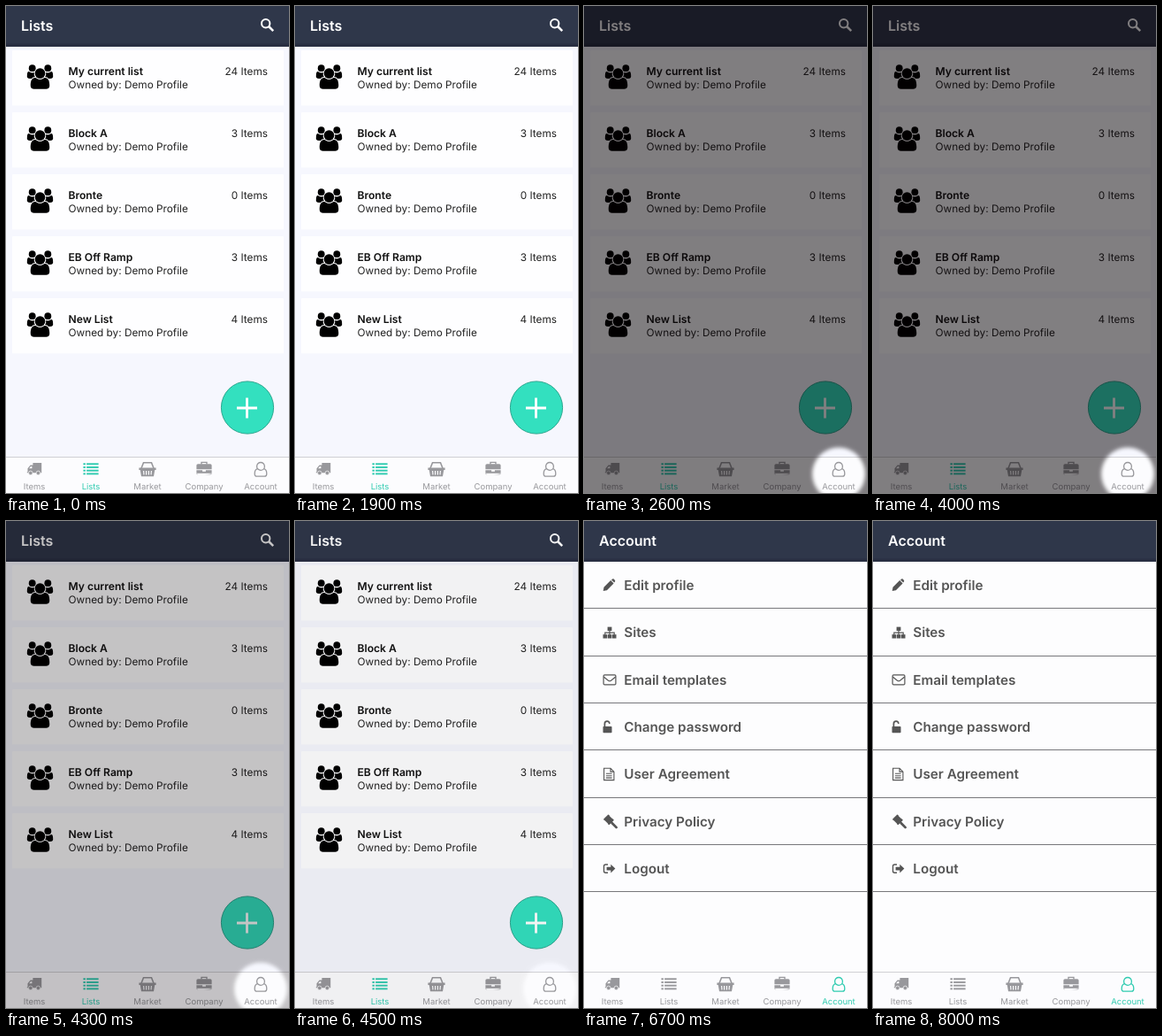
An HTML page that plays this animation: 320x550 px, repeating every 8.1 s.

```html
<!DOCTYPE html>
<html lang="en">
<head>
<meta charset="utf-8">
<title>Lists and account</title>
<style>
html, body { margin: 0; width: 100%; height: 100%; overflow: hidden; background: #fdfdfe }
svg { display: block; width: 320px; height: 550px; font-family: Inter, Roboto, sans-serif; text-rendering: geometricPrecision }
.title { font-size: 16px; font-weight: 600; fill: #fff }
.name { font-size: 12.1px; font-weight: 600; fill: #111 }
.info { font-size: 11.8px; fill: #222 }
.menu { font-size: 15.2px; font-weight: 600; fill: #555 }
.tab { font-size: 9.5px; text-anchor: middle }
.line { fill: none; stroke: currentColor }
.icon { fill: currentColor }
</style>
</head>
<body>
<svg id="stage" viewBox="0 0 320 550"></svg>
<script>
const LOOP = 8100, SWITCH = 6400, DIM = 0.5;
const stage = document.getElementById('stage');

const text = (cls, x, y, s, extra = '') => `<text class="${cls}" x="${x}" y="${y}" ${extra}>${s}</text>`;
const rect = (x, y, w, h, fill = 'currentColor', rx = 0) =>
  `<rect x="${x}" y="${y}" width="${w}" height="${h}" fill="${fill}" rx="${rx}"/>`;
const disc = (x, y, r, extra = '') => `<circle cx="${x}" cy="${y}" r="${r}" ${extra}/>`;
const shape = d => `<path class="icon" d="${d}"/>`;
const line = (d, w = 1.2) => `<path class="line" d="${d}" stroke-width="${w}"/>`;
const at = (x, y, color, body) => `<g transform="translate(${x} ${y})" color="${color}">${body}</g>`;

const header = title => rect(0, 0, 320, 46, '#2f374a') + rect(0, 42.5, 320, 3.5, '#292f42') +
  text('title', 17, 28, title);

// Group of three people, centred on the origin
const people = (() => {
  const side = disc(-576, -640, 256) +
    shape('M-367 0Q-540 5-632 128H-766Q-960 128-960-31Q-960-384-836-384Q-700-299-576-299Q-510-299-443-322Q-470-140-367 0Z');
  return `<g transform="scale(.0153)">${side}<g transform="scale(-1 1)">${side}</g>` + disc(0, -256, 384) +
    shape('M0 203C190 203 290 64 358 64C610 64 704 320 704 637Q704 896 437 896H-437Q-704 896-704 637C-704 320-610 64-358 64C-290 64-190 203 0 203Z') + '</g>';
})();

const wheel = x => disc(x, 4.4, 2.3, 'fill="currentColor" stroke="#fcfcfe" stroke-width=".7"');
const tabs = [
  ['Items', shape('M-1.6-6.9H8.2V4.2H-8.2V3.2H-7.5V-.8L-4.4-4.4H-1.6ZM-6-.8H-2.6V-3H-4Z') + wheel(-4.2) + wheel(4.4)],
  ['Lists', [0, 1, 2, 3].map(i => -6.7 + 3.7 * i).map(y => rect(-8.6, y, 2.5, 1.9) + rect(-4.9, y, 13.5, 1.9)).join('')],
  ['Market', shape('M-9.6-1.4H9.6V1H8.3L7 8.2H-7L-8.3 1H-9.6Z') +
    line('M-7-1L-4.5-7.2H4.5L7-1', 1.6) + '<g color="#fcfcfe">' +
    line('M-4.4 2L-4 6.4M-1.4 2V6.4M1.4 2V6.4M4.4 2L4 6.4', 1.2) + '</g>'],
  ['Company', shape('M-7-5.7H7Q8.6-5.7 8.6-4.2V.2H-8.6V-4.2Q-8.6-5.7-7-5.7ZM-8.6 1.2H-1.9V2.8H1.9V1.2H8.6V4.8Q8.6 6.3-7 6.3Q-8.6 6.3-8.6 4.8ZM-7 6.3H7Q8.6 6.3 8.6 4.8H-8.6Z') +
    line('M-3-5.5V-7.6H3V-5.5', 1.4)],
  ['Account', disc(0, -3.1, 4.4, 'class="line" stroke-width="1.3"') +
    line('M-3.6-.4Q-6.8.2-6.8 5.2Q-6.8 8.2-4.3 8.2H4.3Q6.8 8.2 6.8 5.2Q6.8.2 3.6-.4', 1.3)]
];

const tabBar = active => rect(0, 509, 320, 41, '#fcfcfe') + rect(0, 509, 320, 1, '#d0d0d4') +
  tabs.map(([label, icon], i) => at(32 + 64 * i, 523, i == active ? '#2fcbb0' : '#98989c',
    icon + text('tab', 0, 22.7, label, 'fill="currentColor"'))).join('');

const lists = [['My current list', 24], ['Block A', 3], ['Bronte', 0], ['EB Off Ramp', 3], ['New List', 4]];

const listPage = rect(0, 0, 320, 550, '#f6f7fe') + header('Lists') +
  at(0, 0, '#fff', disc(293.7, 19.7, 4.7, 'class="line" stroke-width="2"') + line('M297 23L302.2 28.2', 2.5)) +
  lists.map(([name, n], i) => at(0, 70 * i, '#000',
    rect(7, 50, 307, 62.5, '#fefeff', 1) + at(38.5, 80, '#000', people) +
    text('name', 70.5, 78, name) + text('info', 70.5, 92.6, 'Owned by: Demo Profile') +
    text('info', 296, 78, n + ' Items', 'text-anchor="end"'))).join('') +
  disc(273, 453.5, 29.6, 'fill="#33e0bf" stroke="#239f86" stroke-width=".9"') +
  at(272.5, 454, '#fff', line('M-11.5 0H11.5M0-11.5V11.5', 2.8)) + tabBar(1);

const menu = [
  ['Edit profile', shape('M-7.3 6.3L-6.5 2.2L1.2-5.5L4.6-2.1L-3.1 5.6ZM2-6.2L3.2-7.2Q4-7.6 4.7-7L6-5.6Q6.5-5 6-4.2L5.2-3Z')],
  ['Sites', rect(-2.4, -6.3, 4.8, 4.4) + [-7.5, -2.3, 2.9].map(x => rect(x, 2.2, 4.6, 4.4)).join('') +
    line('M0-2V2.5M-5.2 2.5V.2H5.2V2.5', 1.2)],
  ['Email templates', '<rect class="line" x="-6.9" y="-5.4" width="13.8" height="11" rx="1.2" stroke-width="1.2"/>' +
    line('M-6.7-3.2L-1.5 1Q0 2 1.5 1L6.7-3.2', 1.2)],
  ['Change password', rect(-7.5, -.6, 10, 7.2, 'currentColor', .8) +
    line('M-5.6 0V-3.5Q-5.6-6.4-2.9-6.4Q-.2-6.4-.2-3.6', 1.7)],
  ['User Agreement', line('M-6.4-6.7H1L4.9-2.8V6.7H-6.4ZM1-6.7V-2.8H4.9M-4-.6H2.6M-4 1.8H2.6M-4 4.2H2.6', 1.1)],
  ['Privacy Policy', '<g transform="rotate(45 -2 -1)">' + rect(-5.2, -6, 6.4, 7.4) +
    rect(-6.6, -6.4, 2.2, 8.2, 'currentColor', 1) + rect(.4, -6.4, 2.2, 8.2, 'currentColor', 1) +
    rect(2, -3.6, 9.6, 2.7, 'currentColor', 1.2) + '</g>'],
  ['Logout', line('M-2-4.6H-4.6Q-6.5-4.6-6.5-2.7V2.7Q-6.5 4.6-4.6 4.6H-2', 1.4) +
    shape('M-3.4-1.8H1.3V-4.8L6.4 0L1.3 4.8V1.8H-3.4Z')]
];

const accountPage = rect(0, 0, 320, 550, '#fdfdfe') + header('Account') +
  menu.map(([label, icon], i) => at(0, 53.33 * i, '#555',
    at(29, 72.6, '#555', icon) + text('menu', 45.3, 78, label)) +
    rect(0, Math.round(98.3 + 53.33 * i), 320, 1, '#77777b')).join('') + tabBar(4);

stage.innerHTML = `<defs>
  <filter id="soft" x="-30%" y="-30%" width="160%" height="160%"><feGaussianBlur stdDeviation="2.2"/></filter>
  <mask id="hole" maskUnits="userSpaceOnUse" x="0" y="0" width="320" height="550">
    ${rect(0, 0, 320, 550, '#fff')}${disc(288, 528.5, 30, 'filter="url(#soft)"')}
  </mask></defs>
  <g id="lists">${listPage}
    <g id="shade" mask="url(#hole)">${rect(0, 0, 320, 550, '#050003')}</g>
  </g>
  <g id="account">${accountPage}</g>`;

const [listView, shade, accountView] = ['lists', 'shade', 'account'].map(id => document.getElementById(id));
const ramp = (t, from, to) => Math.min(1, Math.max(0, (t - from) / (to - from)));

function draw(now) {
  const t = now % LOOP, onLists = t < SWITCH;
  listView.style.display = onLists ? '' : 'none';
  accountView.style.display = onLists ? 'none' : '';
  shade.setAttribute('opacity', DIM * (ramp(t, 2000, 2580) - ramp(t, 4000, 4550)));
}

const start = performance.now();
function tick() {
  draw(performance.now() - start);
  requestAnimationFrame(tick);
}
tick();
</script>
</body>
</html>
```
